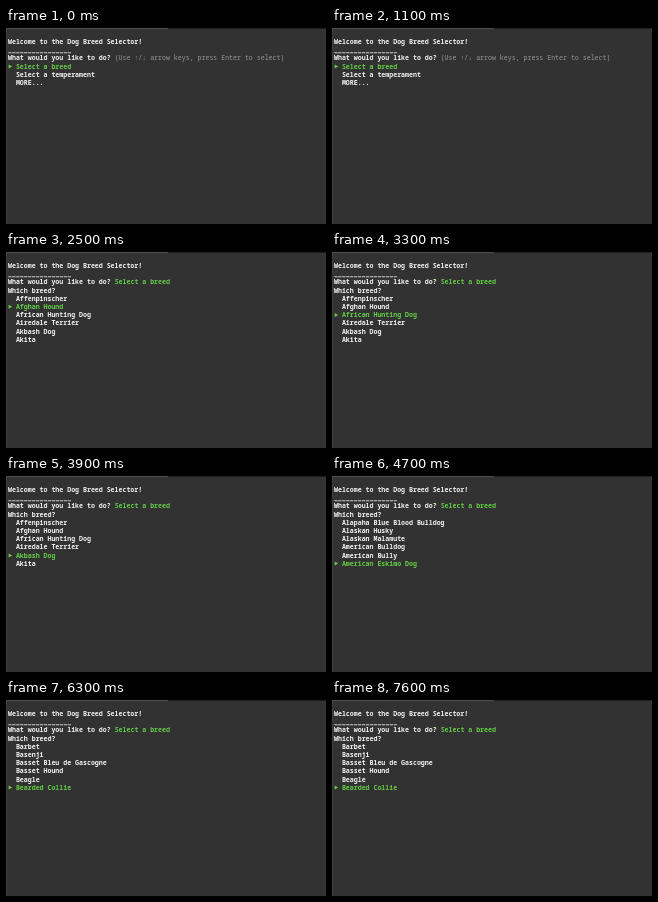
An HTML page with a canvas that plays this animation: 320 px wide and 196 px high, repeating every 8000 ms.

```html
<!DOCTYPE html>
<html lang="en">
<head>
<meta charset="utf-8">
<title>Dog Breed Selector</title>
<style>
html, body { margin: 0; width: 100%; height: 100%; overflow: hidden; background: #323232; }
canvas { display: block; width: 320px; height: 196px; }
</style>
</head>
<body>
<canvas id="stage"></canvas>
<script>
const W = 320, H = 196, LOOP = 8000;
const LEFT = 2, ADVANCE = 3.95, BASELINE = 16, ROW = 8.2;
const WHITE = '#f2f2f2', GREEN = '#64cc46', GREY = '#969696';
const FAMILY = '"Noto Sans Mono", "DejaVu Sans Mono", monospace';

const MENU = ['Select a breed', 'Select a temperament', 'MORE...'];
const MENU_HINT = '(Use ↑/↓ arrow keys, press Enter to select)';
const BREED_HINT = '(Use ↑/↓ and ←/→ arrow keys, press Enter to select, and letter keys';
const PAGES = [
  ['Affenpinscher', 'Afghan Hound', 'African Hunting Dog', 'Airedale Terrier', 'Akbash Dog', 'Akita'],
  ['Alapaha Blue Blood Bulldog', 'Alaskan Husky', 'Alaskan Malamute', 'American Bulldog', 'American Bully', 'American Eskimo Dog'],
  ['American Eskimo Dog (Miniature)', 'American Foxhound', 'American Pit Bull Terrier', 'American Staffordshire Terrier', 'American Water Spaniel', 'Anatolian Shepherd Dog'],
  ['Appenzeller Sennenhund', 'Australian Cattle Dog', 'Australian Kelpie', 'Australian Shepherd', 'Australian Terrier', 'Azawakh'],
  ['Barbet', 'Basenji', 'Basset Bleu de Gascogne', 'Basset Hound', 'Beagle', 'Bearded Collie']
];

// Key presses after the menu: time, page, selected row
const STEPS = [
  [1600, 0, 0], [2500, 0, 1], [3100, 0, 2], [3600, 0, 3], [3900, 0, 4],
  [4200, 1, 4], [4700, 1, 5], [5200, 2, 5], [5700, 3, 5],
  [6300, 4, 5], [7100, 3, 5], [7600, 4, 5]
];

const canvas = document.getElementById('stage');
const ctx = canvas.getContext('2d');
const ratio = window.devicePixelRatio || 1;
canvas.width = W * ratio;
canvas.height = H * ratio;
ctx.scale(ratio, ratio);

function box(x, y, w, h, color) {
  ctx.fillStyle = color;
  ctx.fillRect(x, y, w, h);
}

function print(text, col, row, color = WHITE, weight = 600) {
  ctx.font = `${weight} 6.58px ${FAMILY}`;
  ctx.fillStyle = color;
  ctx.fillText(text, LEFT + col * ADVANCE, BASELINE + row * ROW);
}

function underscores(count, row) {
  const y = BASELINE + row * ROW + 0.2;
  for (let i = 0; i < count; i++) box(LEFT + 0.3 + i * ADVANCE, y, ADVANCE - 0.6, 0.8, WHITE);
}

function pointer(row) {
  const y = BASELINE + row * ROW - 2.2;
  ctx.fillStyle = GREEN;
  ctx.beginPath();
  ctx.moveTo(2.6, y - 2);
  ctx.lineTo(6.2, y);
  ctx.lineTo(2.6, y + 2);
  ctx.fill();
}

function list(items, selected, top) {
  items.forEach((item, i) => {
    const active = i === selected;
    if (active) pointer(top + i);
    print(item, 2, top + i, active ? GREEN : WHITE);
  });
}

function windowFrame() {
  box(0, 0, W, H, '#323232');
  box(0, 0, 1, H, '#424242');
  box(0, 0, 162, 1, '#505050');
  box(162, 0, W - 162, 1, '#202020');
}

function draw(time) {
  windowFrame();
  print('Welcome to the Dog Breed Selector!', 0, 0);
  underscores(16, 1);
  print('What would you like to do?', 0, 2);

  const step = STEPS.filter(([start]) => time >= start).pop();
  if (!step) {
    print(MENU_HINT, 27, 2, GREY, 500);
    list(MENU, 0, 3);
    return;
  }
  const [start, page, selected] = step;
  const hinted = start === STEPS[0][0];
  print(MENU[0], 27, 2, GREEN);
  print('Which breed?', 0, 3);
  if (hinted) {
    print(BREED_HINT, 13, 3, GREY, 500);
    print('to filter)', 1, 4, GREY, 500);
  }
  list(PAGES[page], selected, hinted ? 5 : 4);
}

const origin = performance.now();
function tick() {
  draw((performance.now() - origin) % LOOP);
  requestAnimationFrame(tick);
}
tick();
</script>
</body>
</html>
```
